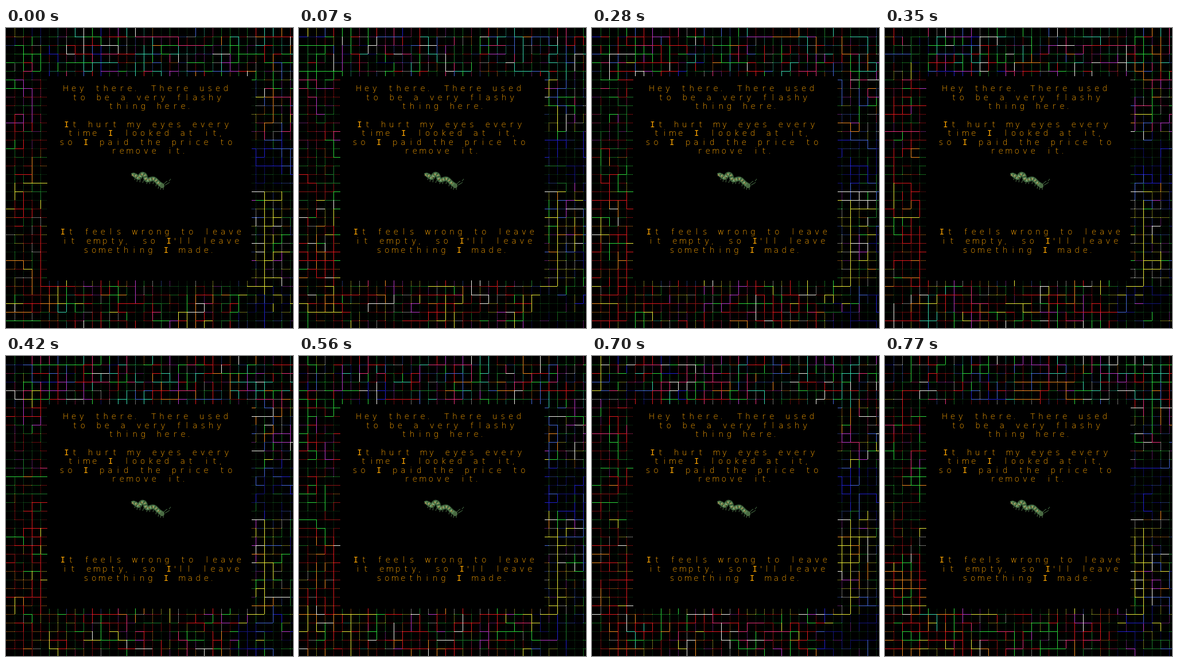
Animation, 500 px wide and 523 px high, one loop 0.84 s. Source, as an HTML page:

```html
<!DOCTYPE html>
<html lang="en">
<head>
<meta charset="utf-8">
<title>Something I made</title>
<style>
html, body { margin: 0; width: 100%; height: 100%; overflow: hidden; background: #000; }
svg { display: block; }
#maze path { fill: none; shape-rendering: crispEdges; }
#words { font: 200 14px "DejaVu Sans", sans-serif; fill: #ffa500; text-anchor: middle; }
#words tspan { font-family: "DejaVu Sans Mono", monospace; }
#bug path { fill: none; }
</style>
</head>
<body>
<svg width="500" height="523" viewBox="0 0 500 523">
  <rect width="500" height="523"/>
  <g id="maze"></g>
  <rect x="72" y="84" width="356" height="356"/>
  <g id="words"></g>
  <g id="bug"></g>
</svg>
<script>
const STEP = 70, COUNT = 12, CELL = 15, COLS = 33, ROWS = 34, WALKS = 250;
const NS = 'http://www.w3.org/2000/svg';
const maze = document.getElementById('maze');
const words = document.getElementById('words');
const bug = document.getElementById('bug');

function add(parent, tag, attrs) {
  const el = document.createElementNS(NS, tag);
  for (const k in attrs) el.setAttribute(k, attrs[k]);
  return parent.appendChild(el);
}

function random(seed) {
  return () => {
    seed = (seed + 0x6d2b79f5) | 0;
    let t = Math.imul(seed ^ (seed >>> 15), 1 | seed);
    t = (t + Math.imul(t ^ (t >>> 7), 61 | t)) ^ t;
    return ((t ^ (t >>> 14)) >>> 0) / 4294967296;
  };
}

const INK = {
  r: '#e0181c', d: '#8c1414', o: '#f08a20', y: '#e8e838', g: '#2bd83c', e: '#1c7a2c',
  c: '#38d8b0', b: '#2020d0', n: '#14147c', u: '#4468d8', m: '#b838c8', p: '#e83078', w: '#f0f0e8'
};

// Colours and share of lit paths for each part of the border.
function zone(x, y) {
  if (y < 84) {
    if (x < 75) return ['rpggebuyw', 0.8];
    if (x < 210) return ['mbugrcrpgw', 0.95];
    return ['wcgrmpcoureg', 1];
  }
  if (x < 75) {
    if (y < 200) return ['rrrggpdme', 0.8];
    if (y < 270) return ['rrgggeod', 0.75];
    if (y < 315) return ['rrdgey', 0.5];
    return ['rrrrooydgw', 0.85];
  }
  if (y > 435) {
    if (x < 120) return ['rrroyygc', 0.9];
    if (x < 400) return ['rrrmgwoypdge', 0.95];
    return ['ynnbmuge', 0.5];
  }
  if (y < 195) return ['gguupomwy', 0.75];
  if (y < 280) return ['bbbnue', 0.5];
  return x < 482 ? ['wwyyygmou', 0.9] : ['eenu', 0.3];
}

const inBox = (x, y) => x > 72 && x < 428 && y > 84 && y < 440;
const pick = (rnd, s) => s[Math.floor(rnd() * s.length)];

// Edge key: column, row of its left or top end, and whether it is vertical.
const key = (i, j, v) => (j * 40 + i) * 2 + v;

function walk(rnd, lit, i, j) {
  let dir = Math.floor(rnd() * 4), ink = '';
  const length = 4 + rnd() * 7;
  for (let n = 0; n < length; n++) {
    if (n && rnd() < 0.45) dir = (dir + (rnd() < 0.5 ? 1 : 3)) % 4;
    const ni = i + [1, 0, -1, 0][dir], nj = j + [0, 1, 0, -1][dir];
    if (ni < 0 || nj < 0 || ni > COLS + 1 || nj > ROWS + 1) return;
    if (inBox(ni * CELL, nj * CELL) && inBox(i * CELL, j * CELL)) return;
    const inks = zone(i * CELL, j * CELL)[0];
    if (!inks.includes(ink) || rnd() < 0.3) ink = pick(rnd, inks);
    lit.set(key(Math.min(i, ni), Math.min(j, nj), dir % 2), ink);
    i = ni;
    j = nj;
  }
}

function run(lit, i, j, v, n, ink) {
  for (let k = 0; k < n; k++) lit.set(key(i + (v ? 0 : k), j + (v ? k : 0), v), ink);
}

function drawMaze(index) {
  const rnd = random(811 + index * 97);
  const lit = new Map(), paths = {};
  for (let n = 0; n < WALKS;) {
    const i = Math.floor(rnd() * (COLS + 1)), j = Math.floor(rnd() * (ROWS + 1));
    const x = i * CELL, y = j * CELL;
    if (inBox(x, y) || rnd() > zone(x, y)[1] ** 2) continue;
    walk(rnd, lit, i, j);
    n++;
  }
  // Routes that stay lit throughout.
  run(lit, 28, 19, 0, 2, 'w');
  run(lit, 30, 20, 1, 10, 'y');
  run(lit, 28, 30, 0, 2, 'y');
  run(lit, 27, 31, 0, 1, 'y');
  run(lit, 4, 23, 1, 7, 'r');

  for (let j = 0; j <= ROWS; j++) {
    for (let i = 0; i <= COLS; i++) {
      for (let v = 0; v < 2; v++) {
        if (v ? !i : !j) continue;
        const x = i * CELL, y = j * CELL;
        if (inBox(x, y) && inBox(x + (v ? 0 : CELL), y + (v ? CELL : 0))) continue;
        const [inks, share] = zone(x, y);
        let ink = lit.get(key(i, j, v)), look = 'solid';
        if (!ink) {
          look = rnd() < share * 0.85 ? 'dots' : 'dim';
          ink = look === 'dim' ? 'e' : pick(rnd, inks);
        }
        const id = look + ' ' + ink;
        paths[id] = (paths[id] || '') +
          (v ? `M${x + 0.5} ${y}v${CELL}` : `M${x} ${y + 0.5}h${CELL}`);
      }
    }
  }

  const g = add(maze, 'g', { display: 'none' });
  for (const id of Object.keys(paths).sort()) {
    const [look, ink] = id.split(' ');
    const p = add(g, 'path', { d: paths[id], stroke: INK[ink] });
    if (look !== 'solid') {
      p.setAttribute('stroke-dasharray', '1 1');
      p.setAttribute('opacity', look === 'dots' ? 0.9 : 0.5);
    }
  }
  return g;
}

// Fixed pitch, with a narrow apostrophe and low marks set to the left.
function line(text, x, y) {
  const xs = [];
  for (const ch of text) {
    if (ch === "'") x -= 3;
    xs.push((x - ('.,'.includes(ch) ? 4 : 0)).toFixed(1));
    x += ch === "'" ? 10 : 13.95;
  }
  const el = add(words, 'text', { x: xs.join(' '), y });
  for (const part of text.split(/(I)/)) {
    if (part === 'I') add(el, 'tspan', {}).textContent = part;
    else el.append(part);
  }
}

function drawWords() {
  line('Hey there. There used', 104, 110);
  line('to be a very flashy', 120, 126);
  line('thing here.', 183, 141);
  line('It hurt my eyes every', 105.5, 173);
  line('time I looked at it,', 112.5, 188);
  line('so I paid the price to', 97.5, 204);
  line('remove it.', 188, 219);
  line('It feels wrong to leave', 99, 360);
  line("it empty, so I'll leave", 102.5, 376);
  line('something I made.', 139.5, 392);
}

function drawBug() {
  const body = 'M220 257C226 253 228 264 233 260C236 253 242 253 243 261' +
    'C245 269 250 263 256 263C262 263 262 270 273 275';
  const coat = (stroke, width, dash = 'none') =>
    add(bug, 'path', { d: body, stroke, 'stroke-width': width, 'stroke-dasharray': dash });
  add(bug, 'path', {
    d: 'M218 258l4-3M225 262l-1 3M229 264l-1 4M234 264l-1 5M240 265l-2 5M246 268l-1 4' +
       'M251 268l-1 4M257 268l-1 4M262 272l-1 4M266 276l-1 4M270 278l-1 4M274 278v4',
    stroke: '#4f7048'
  });
  add(bug, 'path', { d: 'M274 273l5-5 2-1M277 274l5-3 3-2M284 267l3-4', stroke: '#4f7a4c' });
  coat('#2c482b', 8.5);
  coat('#55804f', 6.5, '4 1');
  coat('#9ab888', 3.5, '1.2 4');
  coat('#b8803c', 2, '1.5 5');
  add(bug, 'circle', { cx: 272, cy: 275, r: 4, fill: '#496a42' });
}

const looks = Array.from({ length: COUNT }, (_, i) => drawMaze(i));
drawWords();
drawBug();

let shown = -1;
function tick() {
  const now = Math.floor(performance.now() / STEP) % COUNT;
  if (now !== shown) {
    looks.forEach((g, i) => g.setAttribute('display', i === now ? 'inline' : 'none'));
    shown = now;
  }
  requestAnimationFrame(tick);
}
tick();
</script>
</body>
</html>
```
